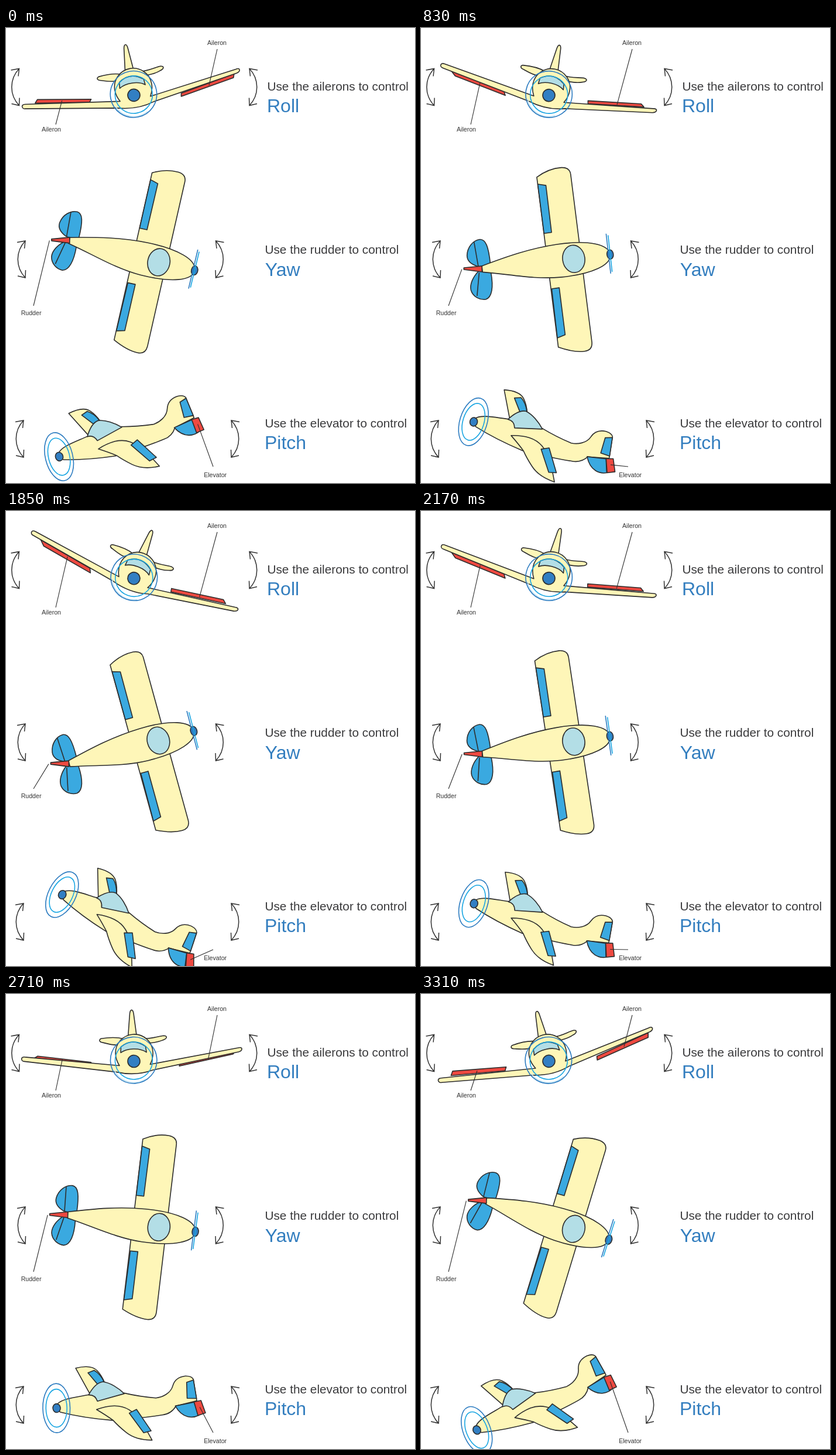
Write an HTML page that moves like this. It is 699x778 px and loops after 3780 ms.

```html
<!DOCTYPE html>
<html lang="en">
<head>
<meta charset="utf-8">
<title>Roll, yaw and pitch</title>
<style>
html, body { margin: 0; width: 100%; height: 100%; overflow: hidden; background: #fff; }
svg { display: block; font-family: "Liberation Sans", Arial, sans-serif; }
.plane { stroke: #2d2d2d; stroke-width: 1.6; stroke-linejoin: round; fill: #fef6b8; }
.blue { fill: #3aa9e0; }
.red { fill: #ee4940; }
.glass { fill: #b3dee6; }
.hub { fill: #327fc3; }
.ring { fill: none; stroke: #2b7bc0; }
.inner { fill: none; stroke: #18a5e2; }
.ghost { fill: none; stroke: #c3e4f3; }
.leader { stroke: #2d2d2d; stroke-width: 1.1; }
.arrow { fill: none; stroke: #333; stroke-width: 1.5; }
.label { font-size: 10.6px; fill: #333; }
.lead { font-size: 20.8px; fill: #3a3a3c; }
.axis { font-size: 32px; fill: #337ebf; }
</style>
</head>
<body>
<svg width="699" height="778" viewBox="0 0 699 778">
  <defs>
    <path id="arrow" class="arrow" d="M0 0C-17 18 -17 45 0 63M-14 2.5L0 0L-1.5 13M-13 60L0 63L.5 50"/>
  </defs>
  <g id="arrows"></g>

  <g id="roll" class="plane">
    <path d="M211 74L216.500 33C218 25.500 222 25.500 223 33L226 74Z"/>
    <path d="M204 76C190 71 175 72 165 73C160 75 162 79 168 80C177 83 188 87 195 85Z"/>
    <path d="M236 77C250 79 262 75 272 74.500C279 75 278 80 270 82C262 85 250 86 243 85Z"/>
    <polygon id="leftAileron" class="red"/>
    <polygon id="rightAileron" class="red"/>
    <path d="M193.500 121L33 96.500C25 95 26 104 32 104L187 131.500Q220 141 250 132L398 110C406 108 406 101 398 103L246 122Q252 112 252 101A32 32 0 0 0 188 101Q188 111 193.500 121Z"/>
    <path class="glass" d="M197 99L198 89Q219 74 240 91L241 101C230 92 208 92 197 99Z"/>
    <path class="ghost" d="M184 128A37 37 0 0 0 236 147"/>
    <circle class="ring" cx="218.300" cy="113.300" r="39.700"/>
    <circle class="inner" cx="218.500" cy="114" r="32"/>
    <circle class="hub" cx="218.500" cy="115" r="10.500"/>
  </g>

  <g id="yaw" class="plane">
    <path d="M218 250Q240 238 262 239.500Q276 241 276 253L272.500 542Q272 556 258 556Q240 556 214.500 543Z"/>
    <path class="blue" d="M218 262L231.500 266L230 347L217 347ZM217 442.500L230 442.500L229 523.500L215 527Z"/>
    <path class="blue" d="M104 388L97 387C86 382 80 376 81.500 366C84 352 95 342 107 342C117 343 120 356 119 386Z"/>
    <path class="blue" d="M118 401L104 397L98 395C86 404 79 416 80 426C82 438 93 445 103 445C114 443 119 426 118 401Z"/>
    <path d="M98 387L96.500 345M98 398L89 437"/>
    <path d="M104 387.500C150 377 190 369 236 368.500C290 368 324 380 324 398C324 416 290 427 235 425C190 423 150 408 104 398Z"/>
    <ellipse class="glass" cx="261.300" cy="397" rx="19" ry="23.500"/>
    <ellipse class="hub" cx="324" cy="398" rx="5.500" ry="8"/>
    <path class="ring" d="M322 362L320.500 430.500"/>
    <path class="inner" d="M325 365L323.300 428"/>
  </g>
  <path id="rudder" class="plane red" d="M-30 -2.500L1 -5.500L1 4.500L-30 .5Z"/>

  <g id="pitch" class="plane">
    <path d="M145 677L126 632C140 630 155 631 162 640Q169 649 173 663Z"/>
    <path class="blue" d="M146 642L157 639Q167 646 172 661L160 663Z"/>
    <path d="M88 690C97 681 122 681.500 143 679.500L204 683Q230 692 257 697C268 697 283 692 288 679C293 667 304 665 311 665Q322 666 324 672L326 709L290 714Q280 727 265 727Q230 729 178 727Q130 718 92 704Q84 697 88 690Z"/>
    <path class="glass" d="M143 680C152 667 162 660 170 660C182 663 195 673 204 684L157 692Q154 680 143 680Z"/>
    <path d="M154 706Q170 702 185 703C205 705 215 715 229 735L243 768Q215 765 200 750Q188 738 180 727Q170 718 154 706Z"/>
    <path class="blue" d="M209 718L222 713L243 752L230 754ZM312 676L324 673L326 705L310 703Z"/>
    <path class="blue" d="M288.500 714L321 711L327 734C317 738 299 738 288.500 714Z"/>
    <path id="elevator" class="red" d="M321 710.500L333 708.500L340 730L327 734Z"/>
    <g transform="rotate(5 86 696)">
      <ellipse class="ring" cx="86.200" cy="696.500" rx="23.300" ry="42"/>
      <ellipse class="inner" cx="86.200" cy="696.500" rx="18" ry="32.500"/>
    </g>
    <ellipse class="hub" cx="86.500" cy="696.500" rx="6.500" ry="7.500"/>
  </g>

  <line id="leftLine" class="leader" x1="85" y1="165"/>
  <line id="rightLine" class="leader" x1="361" y1="36"/>
  <line id="rudderLine" class="leader" x1="47" y1="475"/>
  <line id="elevatorLine" class="leader" x1="354" y1="750"/>

  <g class="label">
    <text x="344" y="29">Aileron</text>
    <text x="61" y="177">Aileron</text>
    <text x="25.700" y="491">Rudder</text>
    <text x="338.200" y="768">Elevator</text>
  </g>
  <g class="lead">
    <text x="446.400" y="107">Use the ailerons to control</text>
    <text x="442.400" y="386">Use the rudder to control</text>
    <text x="442.400" y="683">Use the elevator to control</text>
  </g>
  <g class="axis">
    <text x="446" y="144">Roll</text>
    <text x="442.800" y="424">Yaw</text>
    <text x="442" y="720">Pitch</text>
  </g>
</svg>
<script>
const $ = id => document.getElementById(id);
const LOOP = 3780;

// Poses at chosen steps; the motion between them is smooth but shown in steps.
const STEPS = [0, 6, 11, 17, 23, 30, 38];
const ROLL = [-10.5, 0, 11.1, 20.1, 12.1, -3.5, -14.6];
const YAW = [12.1, 0, -7.9, -16.4, -9.3, 6.1, 16.2];
const PITCH = [-19.1, 0, 12.1, 22, 13.3, -6, -26];
const AILERON = [.82, 0, -.87, -1, -.95, .5, 1];

const PIVOT = { roll: [218, 115], yaw: [245, 398], pitch: [197, 701.5] };
const HINGE = [321, 711];

$('arrows').innerHTML = [[22.5, 416, 69.5], [33, 358.5, 364], [30, 385, 671]].map(([l, r, y]) =>
  `<use href="#arrow" transform="translate(${l} ${y})"/>
   <use href="#arrow" transform="translate(${r} ${y}) scale(-1 1)"/>`).join('');

function stepAt(t) {
  return t < 1790
    ? Math.min(17, Math.floor((t + 17) / 77))
    : Math.min(38, 18 + Math.floor((t - 1790) / 75.9));
}

// Cubic interpolation that rests at the turning points.
function pose(keys, step) {
  const secant = i => (keys[i + 1] - keys[i]) / (STEPS[i + 1] - STEPS[i]);
  const slope = i => {
    if (i === 0) return secant(0);
    if (i === keys.length - 1) return 0;
    const a = secant(i - 1), b = secant(i);
    return a * b > 0 ? (a + b) / 2 : 0;
  };
  let i = 0;
  while (i < keys.length - 2 && step >= STEPS[i + 1]) i++;
  const h = STEPS[i + 1] - STEPS[i], u = (step - STEPS[i]) / h, v = 1 - u;
  return v * v * (1 + 2 * u) * keys[i] + u * v * v * h * slope(i)
    + u * u * (3 - 2 * u) * keys[i + 1] - u * u * v * h * slope(i + 1);
}

function turn([x, y], [cx, cy], deg) {
  const a = deg * Math.PI / 180, c = Math.cos(a), s = Math.sin(a);
  return [cx + (x - cx) * c - (y - cy) * s, cy + (x - cx) * s + (y - cy) * c];
}

function rotate(id, deg, pivot) {
  $(id).setAttribute('transform', `rotate(${deg} ${pivot})`);
}

function lineTo(id, [x, y]) {
  $(id).setAttribute('x2', x);
  $(id).setAttribute('y2', y);
}

function draw(t) {
  const step = stepAt(t);
  const [roll, yaw, pitch, d] = [ROLL, YAW, PITCH, AILERON].map(k => pose(k, step));

  rotate('roll', roll, PIVOT.roll);
  $('leftAileron').setAttribute('points', [
    [48.5 + 2 * d, 101.7 - 5 * d], [55, 102.5 - 12.5 * d],
    [145.5, 118.7 - 12.5 * d], [142, 118 - 6 * d]].join(' '));
  $('rightAileron').setAttribute('points', [
    [293 + 7 * d, 121.5 + 6 * d], [292 + 7 * d, 121.8 + 12.2 * d],
    [384 + 9 * d, 108 + 10.4 * d], [388 + 7 * d, 106.8 + 4 * d]].join(' '));
  lineTo('leftLine', turn([97.5 - 1.7 * d, 109 - 9 * d], PIVOT.roll, roll));
  lineTo('rightLine', turn([342 + 7 * d, 115.5 + 8 * d], PIVOT.roll, roll));

  // The rudder stays level while the tail swings.
  rotate('yaw', yaw, PIVOT.yaw);
  const [rx, y] = turn([103, 393], PIVOT.yaw, yaw), x = rx + yaw * .05;
  $('rudder').setAttribute('transform', `translate(${x} ${y})`);
  lineTo('rudderLine', [x - 33.5, y]);

  rotate('pitch', pitch, PIVOT.pitch);
  const tilt = pitch * (pitch < 0 ? -.68 : -.15);
  rotate('elevator', tilt, HINGE);
  lineTo('elevatorLine', turn(turn([330.5, 719.5], HINGE, tilt), PIVOT.pitch, pitch));
}

const start = performance.now();
function tick() {
  draw((performance.now() - start) % LOOP);
  requestAnimationFrame(tick);
}
tick();
</script>
</body>
</html>
```
